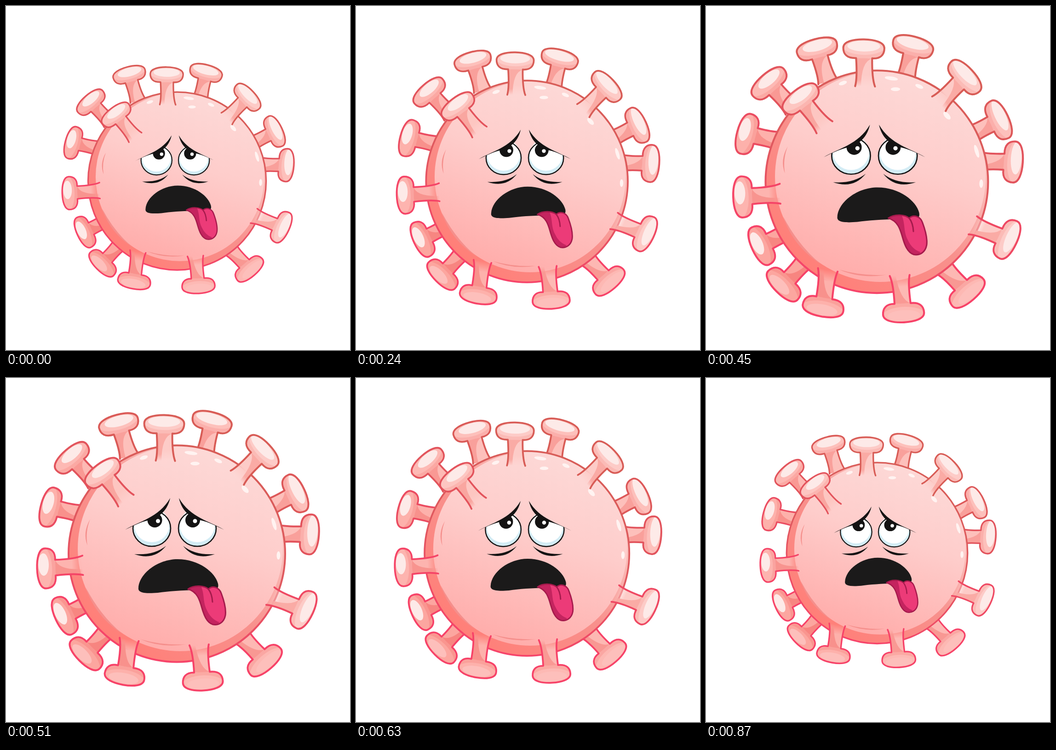
Write an HTML page that moves like this. It is 748x748 px and loops after 900 ms.

```html
<!DOCTYPE html>
<html lang="en">
<head>
<meta charset="utf-8">
<title>Sick virus</title>
<style>
  html, body { margin: 0; width: 100%; height: 100%; overflow: hidden; background: #fff; }
  svg { display: block; width: 100vw; height: 100vh; }
</style>
</head>
<body>
<svg viewBox="0 0 748 748">
  <defs>
    <linearGradient id="skin" gradientUnits="userSpaceOnUse" x1="440" y1="150" x2="290" y2="600">
      <stop offset="0" stop-color="#fdd9d7"/>
      <stop offset=".4" stop-color="#fecdcb"/>
      <stop offset="1" stop-color="#ffaaa8"/>
    </linearGradient>
    <linearGradient id="rim" gradientUnits="userSpaceOnUse" x1="520" y1="220" x2="220" y2="560">
      <stop offset="0" stop-color="#fbcfcc"/>
      <stop offset=".5" stop-color="#f8918d"/>
      <stop offset="1" stop-color="#ff7f78"/>
    </linearGradient>
    <linearGradient id="edge" gradientUnits="userSpaceOnUse" x1="440" y1="150" x2="300" y2="600">
      <stop offset="0" stop-color="#d85d58"/>
      <stop offset=".5" stop-color="#e0595f"/>
      <stop offset="1" stop-color="#f7446a"/>
    </linearGradient>
    <clipPath id="lid"><path d="M258 331C290 312 332 305 357 261H366V380H250Z"/></clipPath>
    <path id="lick" d="M396 459C410 449 432 452 440 459C450 450 464 456 468 468C474 484 479 502 477 516C474 532 462 538 450 536C436 532 430 514 426 500C421 482 416 465 396 459Z"/>
    <clipPath id="tongue"><use href="#lick"/></clipPath>
  </defs>
  <g id="virus">
    <g id="back"></g>
    <circle cx="371.5" cy="382" r="235.5" fill="url(#rim)"/>
    <circle cx="379" cy="371" r="223" fill="url(#skin)"/>
    <circle cx="371.5" cy="382" r="235.5" fill="none" stroke="url(#edge)" stroke-width="4"/>
    <g id="shine" fill="#fff3f1"></g>
    <g fill="#f58f8c">
      <path d="M183 307Q166 336 177 364Q172 334 183 307Z"/>
      <path d="M173 455Q194 519 254 557Q206 518 173 455Z"/>
      <path d="M292 568Q338 588 392 579Q340 582 292 568Z"/>
    </g>
    <g id="front"></g>
    <g id="eyes"></g>
    <path fill="#1b1a1a" d="M288 456C290 425 330 394 373 394C420 394 455 423 461 447C464 459 455 464 440 462C400 460 360 463 330 467C305 469 286 468 288 456Z"/>
    <use href="#lick" fill="#ec3b78"/>
    <path fill="#c4245f" clip-path="url(#tongue)" d="M390 445H420C434 468 426 484 437 505Q446 525 464 531L450 545L425 530Z"/>
    <g fill="none" stroke="#a51a4c" stroke-width="3" stroke-linecap="round" stroke-linejoin="round">
      <use href="#lick"/>
      <path d="M440 459Q448 469 449 487"/>
    </g>
  </g>
</svg>
<script>
const $ = id => document.getElementById(id);
const clamp = v => Math.max(0, Math.min(1, v));
const mix = (a, b, k) => `rgb(${a.map((v, i) => Math.round(v + (b[i] - v) * k))})`;

// Cap centre and tilt of each spike; everything else follows from these.
const back = [
  [245, 100, -15], [448, 95, 15], [630, 251, 65], [660, 340, 94], [563, 615, 139],
  [174, 600, 225], [127, 517, 245], [96, 281, 285], [143, 173, 319]
];
const front = [
  [344, 101, 1], [558, 160, 47], [648, 504, 115], [428, 659, 177],
  [258, 647, 190], [88, 414, 268], [210, 206, 323]
];

function spike([x, y, tilt], i, inFront) {
  const id = (inFront ? "f" : "b") + i;
  const rad = tilt * Math.PI / 180, sin = Math.sin(rad), cos = Math.cos(rad);
  const w = 43.5, h = 20.5, neck = 17, foot = 19, skew = 4, len = inFront ? 79 : 74;
  const side = Math.sin(rad - .44) > 0 ? 1 : -1;

  const tone = (inFront ? .08 : .25) + .42 * clamp((y - x + 100) / 500);
  const light = mix([253, 208, 204], [252, 145, 137], tone);
  const dark = mix([250, 176, 170], [246, 112, 108], tone);
  const line = mix([216, 92, 86], [247, 66, 104], clamp((y - x * .3) / 420));

  const top = s => `${1 + s * neck} ${h - 1}`;
  const knee = s => `${skew * .7 + s * neck * .9} ${len * .78}`;
  const end = s => `${skew + s * (foot + 2)} ${len}`;
  const outline = `M${end(-1)}Q${knee(-1)} ${top(-1)}
    C${-w * .82} ${h} ${-w} ${h * .55} ${-w} ${-h * .1}C${-w} ${-h * .75} ${-w * .5} ${-h} 0 ${-h}
    C${w * .5} ${-h} ${w} ${-h * .75} ${w} ${-h * .1}C${w} ${h * .55} ${w * .82} ${h} ${top(1)}Q${knee(1)} ${end(1)}`;
  const shade = `M${end(side)}Q${knee(side)} ${top(side)}L${top(-side)}
    Q${side * neck * .3} ${h + 6} ${skew + side * foot * .45} ${len}Z`;
  const fade = (key, c) => `<linearGradient id="${key + id}" x1="0" y1="0" x2="0" y2="1">
    <stop offset=".76" stop-color="${c}"/>
    <stop offset="1" stop-color="${c}" stop-opacity="${inFront ? 0 : 1}"/></linearGradient>`;

  // Caps leaning left show a shorter highlight, pushed upwards.
  const lean = Math.max(0, -sin);
  return `<g transform="translate(${x} ${y}) rotate(${tilt})">${fade("l", light)}${fade("d", dark)}
    <path d="${outline}" fill="url(#l${id})"/>
    <path d="${shade}" fill="url(#d${id})"/>
    <path d="M${-w} 0C${-w} ${h * 1.3} ${w} ${h * 1.3} ${w} 0C${w * .6} ${h * .8} ${-w * .6} ${h * .8} ${-w} 0Z"
      fill="${dark}" opacity=".5"/>
    <ellipse cx="${-sin * w * .2}" cy="${-h * .3}" rx="${w * (.8 - .24 * lean)}" ry="${h * .56}"
      fill="${cos < -.6 ? "#fdbfbb" : "#fdeae8"}"/>
    <path d="${outline}" fill="none" stroke="${line}" stroke-width="4" stroke-linecap="round" stroke-linejoin="round"/>
  </g>`;
}

const eye = (pupil, glint) => `<g clip-path="url(#lid)">
    <ellipse cx="317" cy="327" rx="41" ry="39" fill="#d3ecf5"/>
    <ellipse cx="317" cy="320" rx="38" ry="37" fill="#fff"/>
    <circle cx="${pupil}" cy="309" r="16" fill="#141313"/>
    <circle cx="${glint}" cy="311" r="4.5" fill="#fff"/>
    <ellipse cx="317" cy="327" rx="41" ry="39" fill="none" stroke="#141313" stroke-width="2.6"/>
  </g>
  <path fill="#141313" d="M259 330C290 311 332 304 357 261C351 288 334 303 311 309C293 313 275 322 259 330Z
    M279 383Q322 386 348 365Q322 398 279 383Z"/>`;

const glow = (angle, i) => `<ellipse cx="371.5" cy="161" rx="${i % 2 ? 14 : 9}" ry="4"
  transform="rotate(${angle} 371.5 382)"/>`;

$("back").innerHTML = back.map((s, i) => spike(s, i, false)).join("");
$("front").innerHTML = front.map((s, i) => spike(s, i, true)).join("");
$("eyes").innerHTML = eye(323.5, 330.5) + `<g transform="translate(733 0) scale(-1 1)">${eye(327, 322)}</g>`;
$("shine").innerHTML = [-19, 8, 24, 73, 91].map(glow).join("") +
  `<ellipse cx="411" cy="186" rx="10" ry="4"/><ellipse rx="10" ry="5" transform="translate(520 242) rotate(47)"/>`;

// Linear pulse from 1 to 1.25 and back, in 30 ms steps; the artwork is drawn at 1.2167.
const loop = 900, step = 30, drawn = 1.2167;
function tick() {
  const t = Math.floor(performance.now() % loop / step) * step;
  const s = (1 + .25 * (1 - Math.abs(t / (loop / 2) - 1))) / drawn;
  $("virus").setAttribute("transform", `translate(374.5 374) scale(${s}) translate(-374.5 -374)`);
  requestAnimationFrame(tick);
}
tick();
</script>
</body>
</html>
```
